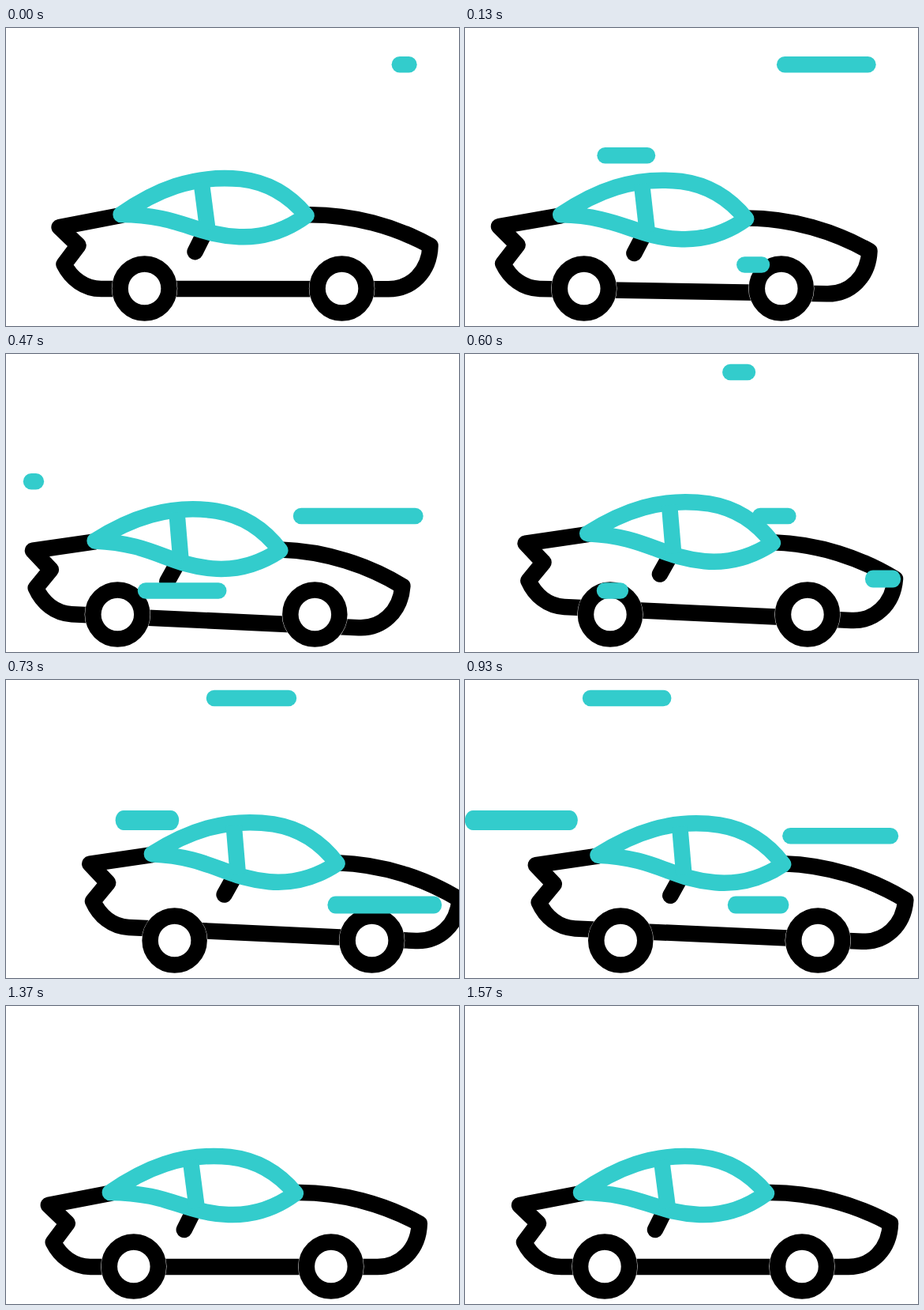
Write an HTML page that moves like this. It is 574x377 px and loops after 1670 ms.

```html
<!DOCTYPE html>
<html lang="en">
<head>
<meta charset="utf-8">
<title>Sports car</title>
<style>
  html, body { margin: 0; width: 100%; height: 100%; overflow: hidden; background: #fff; }
  svg { display: block; width: 574px; height: 377px; }
  .line { fill: none; stroke: #000; stroke-width: 20.5; stroke-linecap: round; stroke-linejoin: round; }
  .teal { stroke: #3cc; }
  .wheel { fill: #fff; }
</style>
</head>
<body>
<svg viewBox="0 0 574 377">
  <g id="car">
    <g id="body" class="line">
      <path d="M147 237 L69 252 L93 275 L75 299 C84 317 101 330 122 330 H486 C515 330 538 308 539 275 C495 251 440 235 382 236"/>
      <path d="M241 283 L253 259"/>
      <g class="teal">
        <path d="M147 236 C190 206 238 185 299 191 C334 195 362 213 382 237 C352 259 322 265 297 264 C241 262 222 236 147 236 Z"/>
        <path d="M249 195 L257 256" stroke-linecap="butt"/>
      </g>
    </g>
    <g fill="#fff">
      <circle cx="177" cy="329.5" r="41.7"/>
      <circle cx="427" cy="329.5" r="41.7"/>
    </g>
    <circle class="line wheel" cx="177" cy="329.5" r="31"/>
    <circle class="line wheel" cx="427" cy="329.5" r="31"/>
  </g>
  <g id="streaks" fill="#3cc"></g>
</svg>
<script>
// Times below are in steps of 1/30 s.
const LOOP = 1670, LAST = 47, RUN = 199, LAG = 5.3, CAP = 10.2;
const car = document.getElementById('car');
const body = document.getElementById('body');
const layer = document.getElementById('streaks');

const progress = (n, from, to) => Math.max(0, Math.min(1, (n - from) / (to - from)));

function ease(n, from, to) {
  const s = progress(n, from, to);
  return s * s * (3 - 2 * s);
}

// The car drops back, surges ahead, drops back again and settles.
const shift = n => -58.9 * ease(n, -1, 9.8) + 97.1 * ease(n, 9.8, 23)
  - 61.6 * ease(n, 23, 37) + 23.4 * ease(n, 37, 47);
const lift = n => 8.3 * ease(n, -1, 11) - 16.8 * ease(n, 13, 22) + 8.5 * ease(n, 25, 38);
const tilt = n => 2.68 * (ease(n, -1, 11) - ease(n, 26, 42));

// A streak's head runs left from its right end; the tail follows LAG steps later.
function addStreak(y, right, start, duration, height = 20.5) {
  const el = document.createElementNS('http://www.w3.org/2000/svg', 'rect');
  const set = attrs => {
    for (const name in attrs) el.setAttribute(name, attrs[name]);
  };
  set({ y: y - height / 2, height, rx: CAP, ry: height / 2 });
  layer.append(el);
  return n => {
    const head = right - RUN * progress(n, start, start + duration);
    const tail = right - RUN * progress(n - LAG, start, start + duration);
    const visible = n > start && n < start + duration + LAG;
    set({ x: head - CAP, width: visible ? tail - head + 2 * CAP : 0 });
  };
}

const streaks = [
  addStreak(46.2, 510.5, -0.5, 8.5),
  addStreak(161.2, 231, 2.2, 6.7),
  addStreak(205, 573, 6.7, 7.3),
  addStreak(299.5, 376, 2.8, 11),
  addStreak(23, 358, 16.8, 11),
  addStreak(177.5, 209, 19.4, 8.6, 25),
  addStreak(284.5, 542, 17, 8, 22),
  addStreak(197.2, 539, 23.1, 7.7)
];

function draw(n) {
  car.setAttribute('transform', `translate(${shift(n)} 0)`);
  body.setAttribute('transform', `translate(0 ${lift(n)}) rotate(${tilt(n)} 304 260)`);
  for (const drawStreak of streaks) drawStreak(n);
}

function tick() {
  const ticks = Math.floor(performance.now() % LOOP / 10);
  draw(Math.min(LAST, Math.floor((ticks + 0.5) * 0.3)));
  requestAnimationFrame(tick);
}
tick();
</script>
</body>
</html>
```
